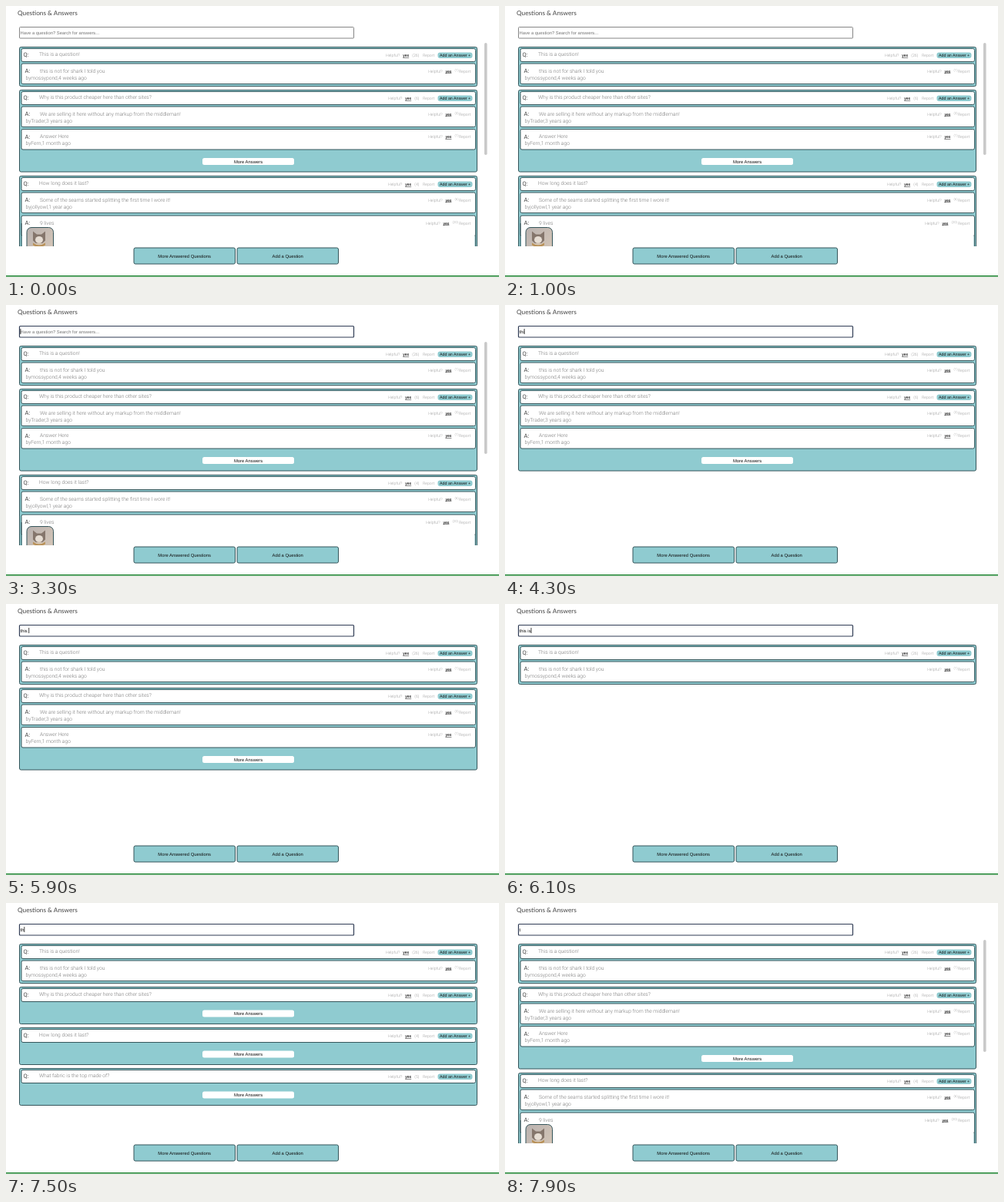
An HTML page that plays this animation: 640 by 353 pixels, repeating every 8 s.

```html
<!DOCTYPE html>
<html lang="en">
<head>
<meta charset="utf-8">
<title>Questions &amp; Answers</title>
<style>
  html, body { margin: 0; width: 100%; height: 100%; overflow: hidden; background: #fff; }
  svg { display: block; }
  text { font: 300 6.7px Roboto, sans-serif; fill: #777; text-rendering: geometricPrecision; white-space: pre; }
  .title { font: 400 8.25px Lato, sans-serif; fill: #444; }
  .mark { font-size: 7.6px; font-weight: 400; fill: #444; }
  .small { font-size: 5.2px; fill: #999; }
  .count { font-size: 4.2px; fill: #999; }
  .yes { font-size: 5.2px; font-weight: 500; fill: #222; text-decoration: underline; }
  .ui { font: 400 5.86px "Liberation Sans", Arial, sans-serif; fill: #111; }
  .hint { fill: #757575; }
  .add { font-size: 5.3px; }
  .mid { text-anchor: middle; }
  .teal { fill: #8fcbd0; }
  .white { fill: #fff; }
  .edge { stroke: #35555a; stroke-width: 1; }
</style>
</head>
<body>
<svg id="stage" width="640" height="353" viewBox="0 0 640 353"></svg>
<script>
const LOOP = 8000;

const text = (x, y, cls, s) => `<text x="${x}" y="${y}" class="${cls}">${s}</text>`;
const box = (x, y, w, h, r, cls) =>
  `<rect x="${x}" y="${y}" width="${w}" height="${h}" rx="${r}" class="${cls}"/>`;

const questions = [
  { title: 'This is a question!', votes: '26', height: 51, answers: [
    ['this is not for shark I told you', 'bymossypond,4 weeks ago', '1']] },
  { title: 'Why is this product cheaper here than other sites?', votes: '6', height: 106.5, more: true, answers: [
    ['We are selling it here without any markup from the middleman!', 'byTrader,3 years ago', '3'],
    ['Answer Here', 'byFern,1 month ago', '1']] },
  { title: 'How long does it last?', votes: '4', height: 160, more: true, answers: [
    ['Some of the seams started splitting the first time I wore it!', 'byjollyowl,1 year ago', '6'],
    ['9 lives', '', '20']] },
  { title: 'What fabric is the top made of?', votes: '5', height: 48, more: true, answers: [] }
];

function votes(x, y, n, raised) {
  x += 3 * (2 - n.length);
  return text(x, y, 'small', 'Helpful?') + text(x + 22.2, y, 'yes', 'yes') +
    text(x + 34.3, y - (raised ? 1.8 : 0), raised ? 'count' : 'small', `(${n})`);
}

const photo = y => `
  <clipPath id="frame"><rect x="27" y="${y}" width="34.5" height="40" rx="6"/></clipPath>
  <g clip-path="url(#frame)">
    <rect x="27" y="${y}" width="35" height="40" fill="url(#tone)"/>
    <path d="M35 ${y + 5}l5 4h6l5-4v12q-8 9-16 0z" fill="#85766c"/>
    <ellipse cx="43" cy="${y + 16}" rx="5" ry="4.5" fill="#e6ddd3"/>
    <ellipse cx="43" cy="${y + 30}" rx="11" ry="10" fill="#d3c4b2"/>
    <path d="M35 ${y + 20}q8 6 16 0v3q-8 5-16 0z" fill="#b9925a"/>
  </g>
  <rect x="27" y="${y}" width="34.5" height="40" rx="6" fill="none" class="edge"/>`;

function answer([body, author, n], y) {
  return box(20, y, 589.5, 26.5, 2, 'white edge') +
    text(24.5, y + 12, 'mark', 'A:') + text(44, y + 11.6, '', body) +
    text(25.5, y + 20.7, '', author) +
    votes(545.2, y + 11.5, n, true) + text(588, y + 11.5, 'small', 'Report');
}

function group({ title, votes: n, height, more, answers }, top, collapsed) {
  const h = collapsed ? 48 : height, bottom = top + h;
  let out = box(17.5, top, 594, h, 2, 'teal edge') +
    box(20, top + 2, 589.5, 17, 2, 'white edge') +
    text(22.5, top + 12, 'mark', 'Q:') + text(43, top + 11.6, '', title) +
    votes(493, top + 12.8, n) + text(541, top + 12.8, 'small', 'Report') +
    box(560.5, top + 7, 45, 7.5, 3, 'teal') +
    text(563, top + 12.7, 'ui add', 'Add an Answer +');
  if (!collapsed) answers.forEach((a, i) => {
    const y = top + 21.5 + 29.5 * i + (h > 150 && i ? 0.5 : 0);
    out += answer(a, y);
    if (!a[1]) out += box(21, y + 14, 587.5, 40, 0, 'white') +
      `<path d="M20 ${y + 10}V320M609.5 ${y + 10}V320" class="edge"/>` + photo(y + 15.5);
  });
  if (more) out += box(255, bottom - 18, 119, 9, 2.5, 'white') +
    text(314.5, bottom - 11.5, 'ui mid', 'More Answers');
  return out;
}

function list(count, collapsed) {
  let top = 53.5, out = '';
  questions.slice(0, count).forEach((q, i) => {
    const folded = collapsed && i > 0;
    out += group(q, top, folded);
    top += (folded ? 48 : q.height) + (folded ? 5 : i ? 5.5 : 5);
  });
  return `<svg width="640" height="313">${out}</svg>`;
}

const ALL = list(3), TWO = list(2), ONE = list(1), FOLDED = list(4, true);

// Start time, typed text, caret shown, visible list
const events = [
  [0, '', 0, ALL],
  [1500, '', 0, ALL],
  [2100, '', 1, ALL],
  [2600, '', 0, ALL],
  [3100, '', 1, ALL],
  [3600, '', 0, ALL],
  [3900, 't', 1, ALL],
  [4000, 'th', 1, ALL],
  [4100, 'thi', 1, TWO],
  [4600, 'thi', 0, TWO],
  [5100, 'thi', 1, TWO],
  [5200, 'this', 1, TWO],
  [5700, 'this', 0, TWO],
  [5800, 'this ', 1, TWO],
  [6000, 'this i', 1, ONE],
  [6100, 'this is', 1, ONE],
  [6600, 'this is', 0, ONE],
  [6900, 'this i', 1, ONE],
  [7100, 'this ', 1, ONE],
  [7200, 'this', 1, ONE],
  [7400, 'thi', 1, ONE],
  [7500, 'th', 1, FOLDED],
  [7600, 't', 1, ALL],
  [7900, 't', 0, ALL]
];

// Advance widths in em
const advance = { t: .278, h: .556, i: .222, s: .5, ' ': .278 };

function search(typed, caret, focused) {
  const x = 18.6 + 5.9 * [...typed].reduce((sum, c) => sum + advance[c], 0);
  return `<rect x="17.5" y="27.5" width="434" height="14.5" rx="1" fill="#fff"
      stroke="${focused ? '#303c55' : '#858585'}" stroke-width="${focused ? 1.2 : 1}"/>` +
    (typed ? text(18.6, 36.6, 'ui', typed)
           : text(18.6, 36.6, 'ui hint', 'Have a question? Search for answers...')) +
    (caret ? `<path d="M${x + .3} 31V38" stroke="#111" stroke-width=".8"/>` : '');
}

const button = (x, label) => box(x, 315, 131.5, 21, 2, 'teal edge') +
  text(x + 65.7, 327.7, 'ui mid', label);

const stage = document.getElementById('stage');
stage.innerHTML = `
  <defs><linearGradient id="tone" x2="1" y2="1">
    <stop stop-color="#b9b2b0"/><stop offset="1" stop-color="#d9c9b8"/>
  </linearGradient></defs>
  ${text(15, 12, 'title', 'Questions &amp; Answers')}
  <g id="search"></g><g id="list"></g>
  <rect id="scroll" x="621" y="48" width="3.6" height="146" rx="1.8" fill="#c9c9c9"/>
  ${button(166, 'More Answered Questions')}${button(300, 'Add a Question')}
  <rect y="351" width="640" height="1.5" fill="#17802b"/>`;
const [searchBox, listBox, scroll] = ['search', 'list', 'scroll'].map(id => document.getElementById(id));

let shown;
function draw() {
  const now = performance.now() % LOOP;
  const event = events.findLast(e => e[0] <= now);
  if (event !== shown) {
    const [start, typed, caret, items] = event;
    searchBox.innerHTML = search(typed, caret, start >= 1500);
    if (!shown || shown[3] !== items) listBox.innerHTML = items;
    scroll.style.display = items === ALL ? '' : 'none';
    shown = event;
  }
  requestAnimationFrame(draw);
}
draw();
</script>
</body>
</html>
```
